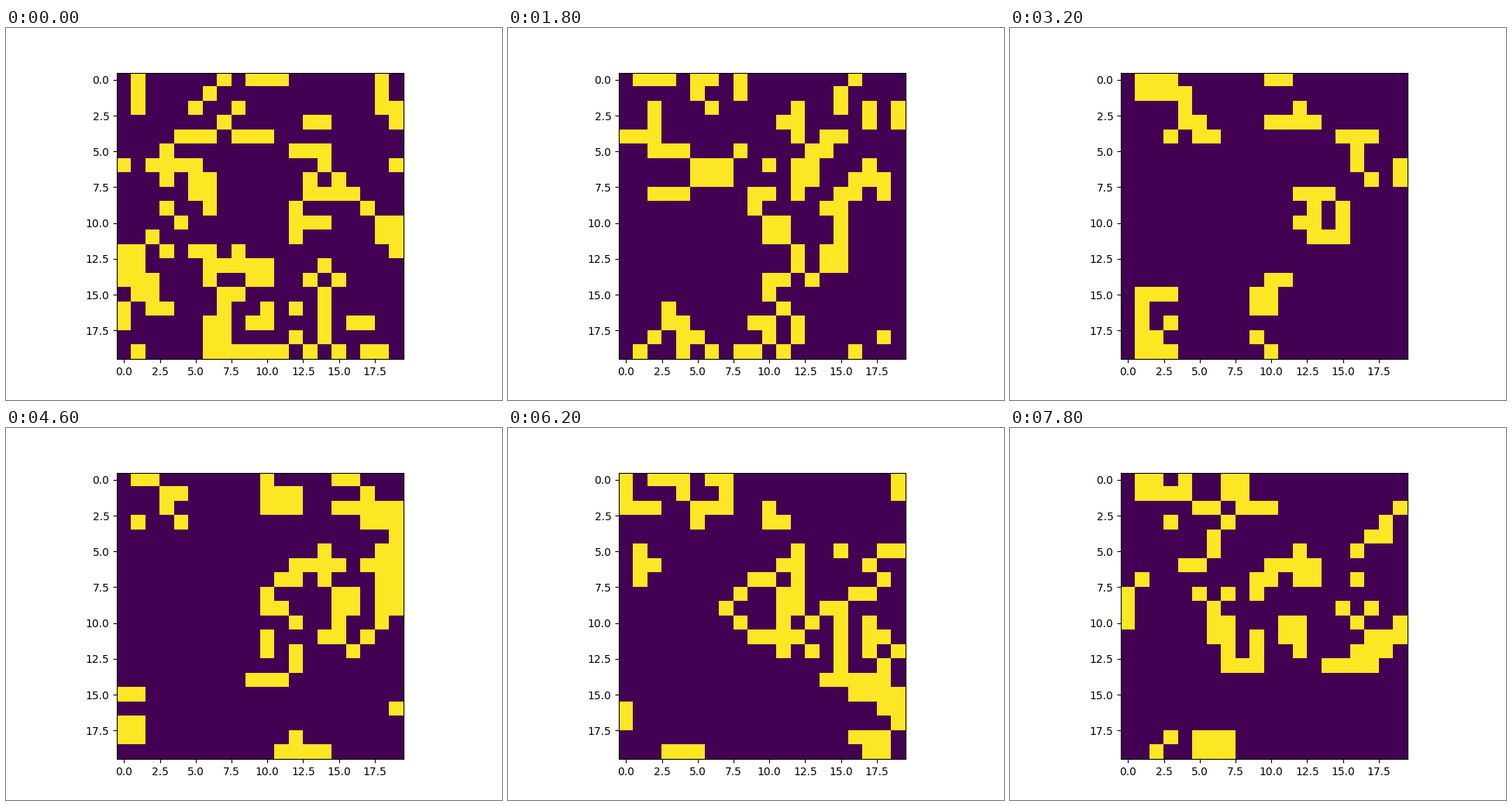
Write a matplotlib script that moves like this. It is 640 px wide and 480 px high and loops after 8000 ms.

```python
import matplotlib.pyplot as plt
import numpy as np
from matplotlib.animation import FuncAnimation

SIZE = 20
STEPS = 40
INTERVAL = 200

# Live columns in each row of the starting board
SEED = [
    [1, 7, 9, 10, 11, 18],
    [1, 6, 18],
    [1, 5, 8, 18, 19],
    [7, 13, 14, 19],
    [4, 5, 6, 8, 9, 10],
    [3, 12, 13, 14],
    [0, 2, 3, 4, 5, 14, 19],
    [3, 5, 6, 13, 15],
    [5, 6, 13, 14, 15, 16],
    [3, 6, 12, 17],
    [4, 12, 13, 14, 18, 19],
    [2, 12, 18, 19],
    [0, 1, 3, 5, 6, 8, 19],
    [0, 1, 6, 7, 8, 9, 10, 14],
    [0, 1, 2, 6, 9, 10, 13, 15],
    [1, 2, 7, 8, 14],
    [0, 2, 3, 7, 10, 12, 14],
    [0, 6, 7, 9, 10, 14, 16, 17],
    [6, 7, 12, 14],
    [1, 6, 7, 8, 9, 10, 11, 13, 15, 17, 18],
]


def first_board():
    board = np.zeros((SIZE, SIZE), dtype=int)
    for row, cols in enumerate(SEED):
        board[row, cols] = 1
    return board


def evolve(board):
    """One generation of Life on a board whose edges wrap around."""
    near = sum(
        np.roll(board, (dy, dx), axis=(0, 1))
        for dy in (-1, 0, 1)
        for dx in (-1, 0, 1)
        if dy or dx
    )
    return ((near == 3) | ((near == 2) & (board == 1))).astype(int)


boards = [first_board()]
while len(boards) < STEPS:
    boards.append(evolve(boards[-1]))

fig, ax = plt.subplots(figsize=(6.4, 4.8), dpi=100)
image = ax.imshow(boards[0], cmap="viridis", vmin=0, vmax=1,
                  interpolation="nearest")


def draw(step):
    image.set_data(boards[step])
    return [image]


anim = FuncAnimation(fig, draw, frames=STEPS, interval=INTERVAL,
                     repeat=True, repeat_delay=0)
plt.show()
```
